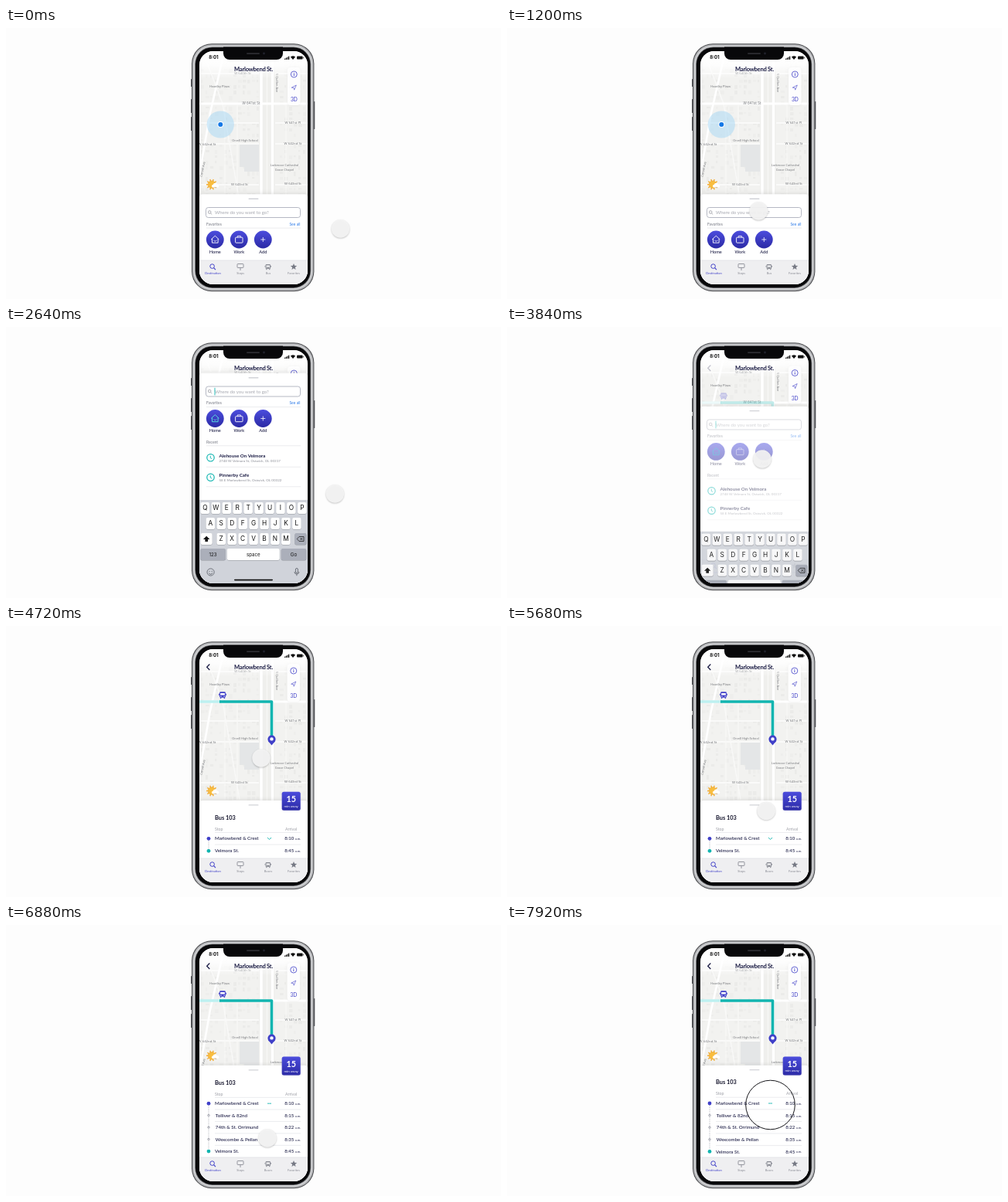
An HTML page with a canvas for the animation above (8000 ms loop, 640x351 px).

```html
<!DOCTYPE html>
<html lang="en">
<head>
<meta charset="utf-8">
<title>Bus app</title>
<style>
html, body { margin: 0; width: 100%; height: 100%; overflow: hidden; background: #fdfdfd; }
canvas { display: block; width: 640px; height: 351px; }
</style>
</head>
<body>
<canvas id="stage"></canvas>
<script>
const LOOP = 8000;
const cv = document.getElementById('stage');
const c = cv.getContext('2d');
const dpr = window.devicePixelRatio || 1;
cv.width = 640 * dpr;
cv.height = 351 * dpr;

const BLUE = '#4040c8', NAVY = '#1c1d45', TEAL = '#12b5b0', GREY = '#8b8d96';
const LATO = 'Lato, sans-serif', UI = 'Inter, sans-serif', MAP = '"Noto Sans", sans-serif';

const clamp = v => Math.max(0, Math.min(1, v));
const mix = (a, b, p) => a + (b - a) * p;
const ease = v => v < .5 ? 4 * v ** 3 : 1 - (2 - 2 * v) ** 3 / 2;
const prog = (t, a, b) => ease(clamp((t - a) / (b - a)));

function txt(s, x, y, size, color, o = {}) {
  c.font = `${o.weight || 400} ${size}px ${o.font || LATO}`;
  c.letterSpacing = (o.space || 0) + 'px';
  c.textAlign = o.align || 'left';
  c.textBaseline = 'middle';
  c.fillStyle = color;
  c.fillText(s, x, y);
}
function box(x, y, w, h, r, fill, stroke, lw = 1) {
  c.beginPath();
  c.roundRect(x, y, w, h, r);
  if (fill) { c.fillStyle = fill; c.fill(); }
  if (stroke) { c.strokeStyle = stroke; c.lineWidth = lw; c.stroke(); }
}
function disc(x, y, r, fill, stroke, lw = 1) {
  c.beginPath();
  c.arc(x, y, r, 0, 7);
  if (fill) { c.fillStyle = fill; c.fill(); }
  if (stroke) { c.strokeStyle = stroke; c.lineWidth = lw; c.stroke(); }
}
function line(pts, color, lw = 1, close) {
  c.beginPath();
  for (let i = 0; i < pts.length; i += 2) c.lineTo(pts[i], pts[i + 1]);
  if (close) c.closePath();
  c.strokeStyle = color;
  c.lineWidth = lw;
  c.stroke();
}
function poly(pts, fill) {
  c.beginPath();
  for (let i = 0; i < pts.length; i += 2) c.lineTo(pts[i], pts[i + 1]);
  c.fillStyle = fill;
  c.fill();
}
function faded(a, draw) {
  if (a <= 0) return;
  c.save();
  c.globalAlpha *= a;
  draw();
  c.restore();
}
function shadow(color, blur, dy, draw) {
  c.save();
  c.shadowColor = color;
  c.shadowBlur = blur * dpr;
  c.shadowOffsetY = dy * dpr;
  draw();
  c.restore();
}
function blueFill(y0, y1) {
  const g = c.createLinearGradient(0, y0, 0, y1);
  g.addColorStop(0, '#4b4cdc');
  g.addColorStop(1, '#2c2ba6');
  return g;
}

function drawMap(bus) {
  c.fillStyle = '#f2f2f0';
  c.fillRect(250, 30, 140, 302);
  let seed = 11;
  const rnd = () => (seed = (seed * 16807) % 2147483647) / 2147483647;
  for (let y = 46; y < 222; y += 7)
    for (let x = 252; x < 388; x += 6) {
      const a = rnd(), w = 2 + rnd() * 3, h = 2 + rnd() * 4;
      if (a > .5 && (x < 326 || x > 350)) {
        c.fillStyle = a > .8 ? '#ebebe9' : '#eeeeec';
        c.fillRect(x, y, w, h);
      }
    }
  poly([302, 150, 327, 150, 327, 186, 308, 186, 308, 180, 302, 180], '#e4e6e7');
  for (const y of [59, 123, 150, 203]) {
    line([250, y, 330, y], '#fafaf9', 1.8);
    line([346, y, 390, y], '#fafaf9', 1.8);
  }
  for (const x of [283, 299, 362]) line([x, 100, x, 225], '#f8f8f7', 1.2);
  line([280, 40, 264, 110, 250, 190], '#fff', 2.6);
  line([258, 40, 280, 98, 302, 225], '#f9f9f8', 1.4);
  c.fillStyle = '#efefed';
  c.fillRect(327, 40, 21, 190);
  line([330, 40, 330, 230], '#fff', 3.4);
  line([337.5, 40, 337.5, 230], '#f7f7f6', 1.4);
  line([344.5, 40, 344.5, 230], '#fff', 3.4);
  line([250, 98, 390, 98], '#fff', 3);

  const label = (s, x, y, size = 4.3) =>
    txt(s, x, y, size, '#76787c', { font: MAP, align: 'center' });
  label('W 640th St', 306, 59);
  faded(1 - bus, () => label('W 641st St', 317, 98, 4.7));
  label('W 641st Pl', 371, 123);
  label('W 642nd St', 371, 149.5);
  label('W 642nd St', 260, 151);
  label('W 643rd St', 302, 203);
  label('W 643rd St', 371, 202);
  label('Hazelby Plaza', 276, 76, 4);
  label('Orvell High School', 309, 146, 3.9);
  label('Larkmoor Cathedral', 360, 178, 3.9);
  label('Grace Chapel', 360, 183.5, 3.9);
  const turned = (s, x, y, a) => {
    c.save();
    c.translate(x, y);
    c.rotate(a);
    label(s, 0, 0, 4);
    c.restore();
  };
  turned('S Quillen Ave', 350, 71, Math.PI / 2);
  turned('Corvel Ave', 254.5, 183, -1.35);
}

function busIcon(x, y, s, color) {
  c.save();
  c.translate(x, y);
  c.scale(s, s);
  box(-3.7, -4, 7.4, 7.2, 1.4, color);
  box(-2.7, -2.3, 5.4, 2.5, .4, '#fff');
  disc(-2, 1.7, .6, '#fff');
  disc(2, 1.7, .6, '#fff');
  box(-3, 2.8, 1.5, 1.6, .4, color);
  box(1.5, 2.8, 1.5, 1.6, .4, color);
  box(-4.8, -1.8, .8, 2.4, .3, color);
  box(4, -1.8, .8, 2.4, .3, color);
  c.restore();
}

function drawRoute() {
  line([250, 98, 277, 98], '#bdf0f0', 3.6);
  c.lineJoin = 'round';
  line([276, 98, 343.5, 98, 343.5, 147], TEAL, 3.6);
  c.lineJoin = 'miter';
  busIcon(280, 89.4, 1.05, BLUE);
  poly([338.7, 148.8, 348.3, 148.8, 343.5, 154.5], BLUE);
  disc(343.5, 146.6, 5.1, BLUE);
  disc(343.5, 146.4, 2.2, '#fff');
}

function drawTop(bus) {
  const g = c.createLinearGradient(0, 30, 0, 66);
  g.addColorStop(0, '#fff');
  g.addColorStop(.5, 'rgba(255,255,255,.88)');
  g.addColorStop(1, 'rgba(255,255,255,0)');
  c.fillStyle = g;
  c.fillRect(250, 30, 140, 36);
  const x = 372.3 - .5 * bus, y = 60 - 2 * bus;
  shadow('rgba(0,0,0,.06)', 2, .5, () => box(x - 8.3, y - 9, 16.6, 49, 4, 'rgba(255,255,255,.92)'));
  disc(x, y, 4, null, BLUE, .8);
  c.fillStyle = BLUE;
  c.fillRect(x - .4, y - .7, .9, 2.7);
  c.fillRect(x - .4, y - 2.2, .9, .9);
  line([x - 3.1, y + 17.2, x + 3, y + 14, x + .4, y + 20.2, x - .2, y + 17.5], BLUE, .6, true);
  txt('3D', x, y + 33.4, 6.6, BLUE, { align: 'center' });
}

function drawWeather(y) {
  for (let i = 0; i < 10; i++) {
    const a = i * Math.PI / 5, u = Math.cos(a), v = Math.sin(a);
    line([266 + u * 4.5, y + v * 4.5, 266 + u * 7, y + v * 7], '#f3b13c', 1.5);
  }
  disc(266, y, 4.8, '#f8bd3f', '#e9a02f', .6);
  disc(268, y + 2, 2, '#fff');
  disc(270.5, y + .6, 2.6, '#fff');
  disc(273.2, y + 2, 2, '#fff');
  line([268, y + 4, 273, y + 4], '#c9ccd2', .6);
}

const rule = (y, a = 259, b = 381) => line([a, y, b, y], '#e3e4e8', .7);

function drawHome(T, p) {
  box(258.5, T + 17.2, 122, 13, 3, '#fff', '#a3a6b4', .8);
  disc(263.2, T + 23.2, 1.8, null, GREY, .7);
  line([264.5, T + 24.6, 266.2, T + 26.2], GREY, .7);
  txt('Where do you want to go?', 270, T + 24.1, 6, '#a5a7af');
  if (p > .3) line([270, T + 19, 270, T + 28.6], TEAL, .9);
  txt('Favorites', 259, T + 39.1, 5, '#777a84');
  txt('See all', 380.5, T + 39.1, 5, '#2d7be8', { align: 'right' });
  rule(T + 43.8);
  const y = T + 58.7;
  ['Home', 'Work', 'Add'].forEach((s, i) => {
    const x = 270.3 + 31 * i;
    disc(x, y, 11.4, blueFill(y - 11, y + 11));
    txt(s, x, y + 15.8, 5.6, NAVY, { align: 'center', weight: 500 });
  });
  const hot = p > .3 ? '#5ce9e4' : '#fff';
  line([265.3, y - .2, 270.3, y - 4.8, 275.3, y - .2], hot, .9);
  line([266.5, y - 1, 266.5, y + 4.2, 274.1, y + 4.2, 274.1, y - 1], hot, .9);
  line([268.3, y + 1, 270.3, y + 2.3, 272.3, y + 1], hot, .8);
  box(296.6, y - 2.8, 9.4, 7, .8, null, '#fff', .9);
  line([299.3, y - 2.8, 299.3, y - 4.6, 303.3, y - 4.6, 303.3, y - 2.8], '#fff', .8);
  line([329.3, y, 335.3, y], '#fff', .8);
  line([332.3, y - 3, 332.3, y + 3], '#fff', .8);

  txt('Recent', 259, T + 89.5, 5, '#777a84');
  rule(T + 94);
  [['Alehouse On Velmora', '2748 W Velmora St, Ostwick, OL 00317'],
   ['Pinnerby Cafe', '58 E Marlowbend St, Ostwick, OL 00322']].forEach(([name, street], i) => {
    const q = T + 109.5 + 25.5 * i;
    disc(264.5, q, 4.7, null, TEAL, 1.2);
    line([264.3, q - 2.5, 264.3, q + .3, 266.3, q + 1.4], TEAL, .9);
    txt(name, 275.5, q - 2.4, 6.2, NAVY, { weight: 700 });
    txt(street, 275.5, q + 3.9, 4.5, GREY);
    rule(q + 12);
  });
}

const STOPS = [
  ['Marlowbend & Crest', '8:10'], ['Tolliver & 82nd', '8:15'], ['74th & St. Orrimund', '8:22'],
  ['Wexcombe & Pellan', '8:35'], ['Velmora St.', '8:45']
];

function drawBus(T, open, rows) {
  txt('Bus 103', 270, T + 22.4, 7.4, '#15152c', { weight: 700 });
  txt('Stop', 270, T + 37.2, 5.2, '#9b9da5');
  txt('Arrival', 376, T + 37.2, 5.2, '#9b9da5', { align: 'right' });
  rule(T + 41.5, 270);
  const y0 = T + 49.3, gap = mix(16, 62.4, rows);
  c.setLineDash([1, 1.6]);
  line([262, y0, 262, y0 + gap], '#8d909a', .8);
  c.setLineDash([]);
  STOPS.forEach(([name, time], i) => {
    const end = i == 0 || i == 4, y = y0 + gap * i / 4;
    faded(end ? 1 : clamp(rows * 2 - .8), () => {
      if (end) disc(262, y, 2.4, i ? TEAL : BLUE);
      else disc(262, y, 1.2, '#fff', '#777a88', .7);
      txt(name, end ? 270 : 270.8, y + .3, 6.2, NAVY, { weight: 500 });
      txt(time, 372.3, y + .3, 6, NAVY, { align: 'right', weight: 500 });
      txt('a.m.', 381, y + .8, 4, NAVY, { align: 'right' });
      if (i < 4 && (end || rows > .5)) rule(y + 7.8, 270);
    });
  });
  const d = 1.3 * (1 - open);
  line([338, y0 - d, 340.5, y0 + d, 343, y0 - d], TEAL, .9);
}

function drawBadge(T) {
  const y = T - 11.3;
  shadow('rgba(40,40,140,.2)', 2, .6, () => box(356.7, y, 24, 24, 2.5, blueFill(y, y + 24)));
  txt('15', 368.7, y + 9.9, 10.8, '#fff', { align: 'center', weight: 700 });
  txt('min away', 368.7, y + 18.6, 4.4, '#fff', { align: 'center' });
}

function drawTabs(bus) {
  c.fillStyle = '#efeff1';
  c.fillRect(250, 301, 140, 31);
  line([250, 301, 390, 301], '#dcdde2', .7);
  disc(266.6, 308.6, 2.8, null, BLUE, 1);
  line([268.6, 310.6, 271, 313.2], BLUE, 1.1);
  box(299, 305.5, 8, 5, .8, null, GREY, .9);
  line([303, 310.5, 303, 314], GREY, .9);
  busIcon(338.8, 309.4, .85, GREY);
  const star = [];
  for (let i = 0; i < 10; i++) {
    const a = i * Math.PI / 5 - Math.PI / 2, r = i % 2 ? 1.9 : 4.4;
    star.push(372 + r * Math.cos(a), 309.4 + r * Math.sin(a));
  }
  poly(star, '#777a85');
  ['Destination', 'Stops', bus > .5 ? 'Buses' : 'Bus', 'Favorites'].forEach((s, i) =>
    txt(s, [267.5, 303, 339, 372][i], 318, 4, i ? GREY : BLUE, { align: 'center' }));
}

function key(x, y, w, s, fill = '#fff', size = 8.3) {
  box(x - w / 2, y - 6.9, w, 15, 2, '#92959c');
  box(x - w / 2, y - 7.5, w, 15, 2, fill);
  txt(s, x, y + .5, size, '#111', { align: 'center', font: UI });
}

function drawKeyboard(dy) {
  c.save();
  c.translate(0, dy);
  c.fillStyle = '#d0d3da';
  c.fillRect(250, 224, 140, 110);
  const row = (s, x, y) => [...s].forEach((ch, i) => key(x + 13.95 * i, y, 11.6, ch));
  row('QWERTYUIOP', 257.3, 234.5);
  row('ASDFGHJKL', 264.3, 254.5);
  row('ZXCVBNM', 278.2, 274.5);
  key(259.2, 274.5, 15, '');
  poly([259.2, 270.8, 263.4, 275, 261, 275, 261, 278, 257.4, 278, 257.4, 275, 255, 275], '#111');
  key(380.9, 274.5, 15, '', '#abafba');
  line([376.3, 274.5, 379, 271.5, 385, 271.5, 385, 277.5, 379, 277.5], '#222', .8, true);
  line([380.3, 273, 383.3, 276], '#222', .8);
  line([383.3, 273, 380.3, 276], '#222', .8);
  key(267.6, 294.5, 32.5, '123', '#abafba', 6.2);
  key(319.8, 294.5, 68, 'space', '#fff', 6.2);
  key(372, 294.5, 32.5, 'Go', '#abafba', 6.2);
  disc(264.6, 317.5, 4.6, null, '#555861', .8);
  disc(263, 316.3, .6, '#555861');
  disc(266.2, 316.3, .6, '#555861');
  c.beginPath();
  c.arc(264.6, 318, 2.3, .2, 2.94);
  c.stroke();
  box(374.4, 312.5, 3, 6, 1.5, null, '#555861', .8);
  c.beginPath();
  c.arc(375.9, 317, 3, 0, Math.PI);
  c.stroke();
  line([375.9, 320, 375.9, 322.2], '#555861', .8);
  box(295, 326.7, 50, 1.7, .8, '#111');
  c.restore();
}

function drawBody() {
  const ring = (inset, r, fill) =>
    box(240 + inset, 20.2 + inset, 158.4 - 2 * inset, 321 - 2 * inset, r, fill);
  for (const [x, y, h] of [[239, 66, 10], [239, 92, 18], [239, 115, 18], [398, 95, 36]])
    box(x, y, 1.3, h, .6, '#55565a');
  ring(0, 26, '#4a4b4e');
  ring(1, 25, '#b4b5b8');
  ring(2.6, 23.6, '#d2d3d5');
  ring(4.2, 22.4, '#6a6b6e');
  ring(5, 21.8, '#08080a');
}

function drawStatus() {
  box(281, 24.5, 77, 16.5, [0, 0, 8, 8], '#08080a');
  box(311, 32.2, 17, 1.8, .9, '#2c2d32');
  disc(333.5, 33, 1.4, '#20222c');
  txt('8:01', 268.4, 38.7, 6, '#111', { font: UI, weight: 700, align: 'center' });
  for (let i = 0; i < 4; i++) {
    c.fillStyle = '#111';
    c.fillRect(360 + 1.7 * i, 39.6 - i, 1.2, 1.3 + i);
  }
  c.beginPath();
  c.moveTo(371, 41);
  c.arc(371, 41, 4.6, -2.3, -.84);
  c.fill();
  box(376, 36.5, 7.6, 4.1, 1, '#111');
  c.fillRect(384, 37.8, .7, 1.5);
}

const MOVES = [
  [480, 1200, 325.3, 237], [1680, 2080, 425.3, 216], [2640, 3440, 330, 171],
  [5280, 6000, 338, 276], [7040, 7680, 340.5, 233]
];
const TAPS = [1440, 3500, 6100];

function drawCursor(t) {
  if (t >= 7920) return disc(340.5, 233, 31.8, null, '#16161a', 1);
  let x = 432.5, y = 260;
  for (const [a, b, nx, ny] of MOVES) {
    const p = prog(t, a, b);
    x = mix(x, nx, p);
    y = mix(y, ny, p);
  }
  const press = Math.max(...TAPS.map(a => clamp(1 - Math.abs(t - a) / 120)));
  shadow('rgba(0,0,0,.24)', 2, .8, () =>
    disc(x, y, 11.8 - 1.6 * press, 'rgba(244,244,244,.93)'));
}

function render(t) {
  const up = prog(t, 1680, 2490), down = prog(t, 3520, 4320);
  const open = prog(t, 6160, 6960), rows = prog(t, 6400, 6960);
  const T = t < 3520 ? mix(215.3, 59.8, up) : mix(mix(59.8, 226, down), 181.7, open);
  const bus = down, key = up * (1 - down);

  c.setTransform(dpr, 0, 0, dpr, 0, 0);
  c.fillStyle = '#fdfdfd';
  c.fillRect(0, 0, 640, 351);
  drawBody();

  c.save();
  c.beginPath();
  c.roundRect(250, 30, 140, 302, 18);
  c.clip();
  drawMap(bus);
  faded(1 - bus, () => {
    disc(277.3, 125, 17.6, 'rgba(165,216,246,.5)');
    disc(277.3, 125, 4, '#fff');
    disc(277.3, 125, 3, '#1478e6');
  });
  faded(bus, drawRoute);
  drawTop(bus);
  drawWeather(t < 3520 ? 202.7 : t < 6160 ? 213.5 : T - 12.5);
  shadow('rgba(0,0,0,.1)', 4, -1, () => box(250, T, 140, 300, [4, 4, 0, 0], '#fff'));
  box(313.5, T + 5.3, 13, 1.3, .6, '#d2d3d8');
  faded(clamp(1 - bus * 2), () => drawHome(T, up));
  faded(clamp(bus * 2 - 1), () => drawBus(T, open, rows));
  faded(clamp(bus * 2 - 1), () => drawBadge(T));
  drawTabs(bus);
  faded(clamp(key * 1.25), () => drawKeyboard(158 * (1 - key)));
  txt('Marlowbend St.', 320, 53.5, 7.6, NAVY, { weight: 700, align: 'center', space: -.25 });
  faded(bus, () => line([263.3, 49.5, 259.7, 53.2, 263.3, 57], NAVY, 1.3));
  c.restore();

  drawStatus();
  drawCursor(t);
}

function tick(now) {
  render(now % LOOP);
  requestAnimationFrame(tick);
}
requestAnimationFrame(tick);
</script>
</body>
</html>
```
